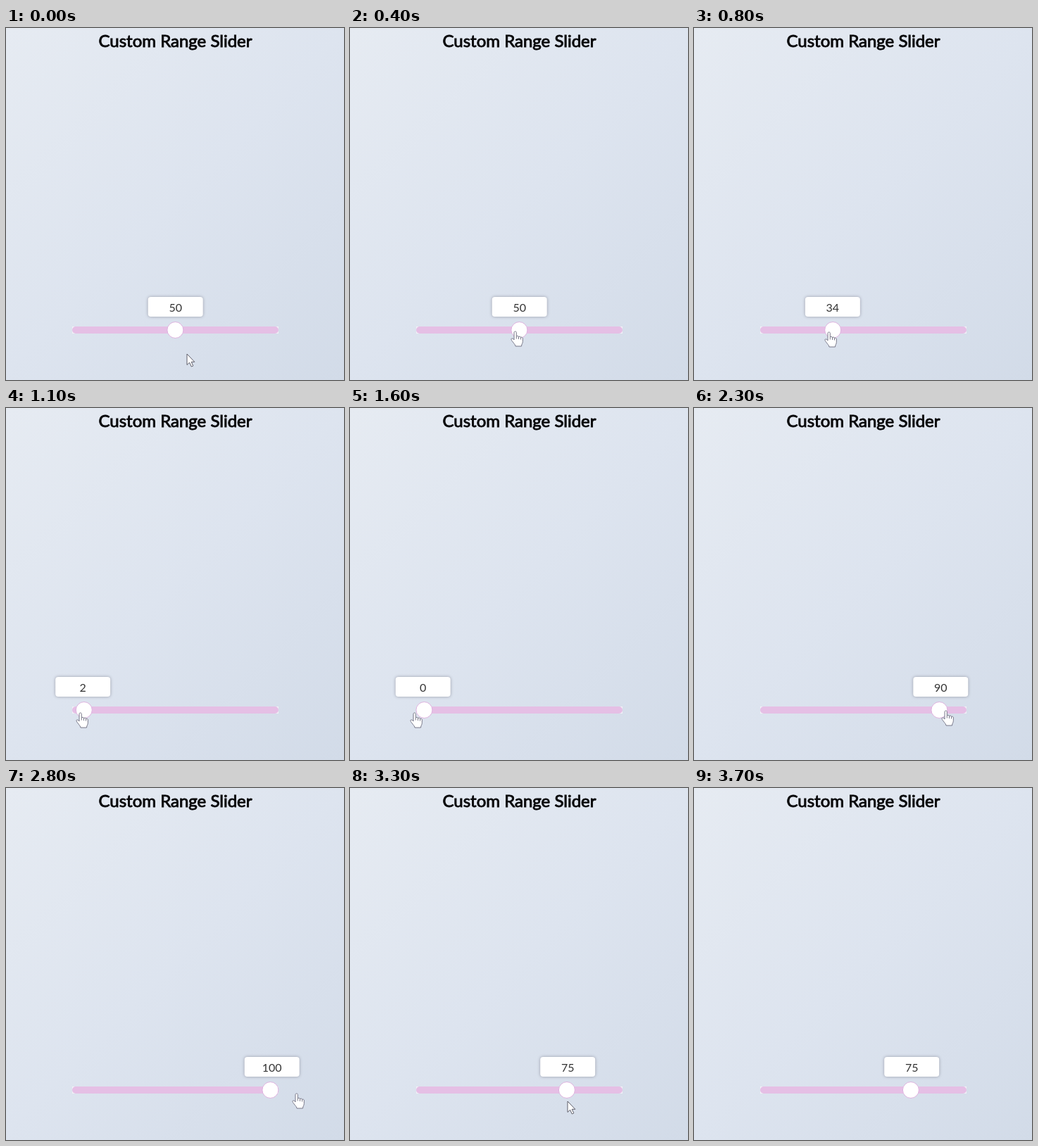
Animation of 480x500 px, one loop 4000 ms. Source, as an HTML page:

```html
<!DOCTYPE html>
<html lang="en">
<head>
<meta charset="utf-8">
<title>Custom Range Slider</title>
<style>
  html, body { margin: 0; width: 100%; height: 100%; overflow: hidden; }
  body { font-family: Lato, sans-serif; }
  .stage {
    position: relative; width: 480px; height: 500px; overflow: hidden;
    background: linear-gradient(135deg, #e6ebf2, #dde4ef 50%, #d2dbe8);
  }
  .stage > * { position: absolute; }
  h1 {
    left: 0; top: 3px; width: 481px; margin: 0;
    font-size: 24px; line-height: 30px; font-weight: 400;
    text-align: center; color: #08080a; -webkit-text-stroke: .9px #08080a;
  }
  .range { left: 94px; top: 424px; width: 293px; height: 10px; background: #f2f1f7; }
  .range i { display: block; height: 100%; border-radius: 5px; background: #e5bfe5; }
  .thumb {
    left: -12px; top: 417px; width: 24px; height: 24px; box-sizing: border-box;
    border: 1px solid #dcb0de; border-radius: 50%; background: #fff;
  }
  .bubble {
    left: -39px; top: 382px; width: 78px; height: 28px; border-radius: 4px;
    background: #fff; box-shadow: 0 0 4px #989ba8;
    font-size: 16px; line-height: 30px; text-align: center; color: #333;
  }
  svg { left: 0; top: 0; overflow: visible; }
  svg path { fill: #fff; stroke: #5c5c68; stroke-linejoin: round; }
  #hand path { stroke: #777788; }
</style>
</head>
<body>
<div class="stage">
  <h1>Custom Range Slider</h1>
  <div class="range"><i></i></div>
  <div class="thumb" id="thumb"></div>
  <div class="bubble" id="bubble">50</div>
  <svg id="cursor" width="20" height="24">
    <path id="arrow" d="M0 0V15.5L3.6 12.2 6.3 18 8.8 16.9 6.2 11.3H10.8Z"/>
    <g id="hand">
      <path d="M-2 1.5C-2-.5 1.3-.5 1.3 1.5V7C2 6 4.5 6 4.5 8 5 6.5 7.5 6.8 7.5 8.8 8 7.6 10.3 8 10.3 10V14.5C10.3 17 8.5 18 8.5 21H0C0 18.5-5.3 14-6 11.4-6 9.2-3.7 9.4-2 12Z"/>
      <path d="M1.3 7V10.5M4.5 8V11M7.5 8.8V11.5"/>
    </g>
  </svg>
</div>
<script>
  const LOOP = 4000, TICK = 100;
  const $ = id => document.getElementById(id);

  const smooth = u => (1 - Math.cos(Math.PI * u)) / 2;
  const speedUp = u => u ** 1.2;
  const slowDown = u => 1 - (1 - u) ** 2;

  // Pointer moves; grab is the pointer's offset from the thumb while dragging.
  const home = { x: 257, y: 463 };
  const moves = [
    { from: 0, to: 400, x: 235, y: 431, ease: smooth },
    { from: 540, to: 1245, x: 92, y: 433, ease: smooth, grab: -5 },
    { from: 1600, to: 2000, x: 260, y: 422, ease: speedUp, grab: 9 },
    { from: 2000, to: 2750, x: 413, y: 434, ease: slowDown, grab: 9 },
    { from: 2800, to: 3200, x: 311, y: 435, ease: smooth, grab: 3 },
    { from: 3200, to: 3700, x: 300, y: 505, ease: speedUp }
  ];

  const clamp = (v, max) => Math.min(max, Math.max(0, v));
  const valueAt = x => Math.round(clamp((x - 105) / 2.7, 100));

  function pose(t) {
    let { x, y } = home, value = 50;
    for (const m of moves) {
      if (t < m.from) break;
      const k = m.ease(clamp((t - m.from) / (m.to - m.from), 1));
      x += (m.x - x) * k;
      y += (m.y - y) * k;
      if (m.grab !== undefined) value = valueAt(x - m.grab);
    }
    return { x: Math.round(x), y: Math.round(y), value };
  }

  const place = (el, x, y) => { el.style.transform = `translate(${x}px, ${y}px)`; };
  const show = (el, on) => { el.style.display = on ? '' : 'none'; };

  function draw(now) {
    const t = Math.floor(now % LOOP / TICK) * TICK;
    const { x, y, value } = pose(t);
    const overRange = y < 440;
    place($('thumb'), 105.4 + value * 2.7, 0);
    place($('bubble'), 103.7 + value * 2.74, 0);
    $('bubble').textContent = value;
    place($('cursor'), x, y);
    show($('hand'), overRange);
    show($('arrow'), !overRange);
  }

  const start = performance.now();
  function loop() {
    draw(performance.now() - start);
    requestAnimationFrame(loop);
  }
  loop();
</script>
</body>
</html>
```
